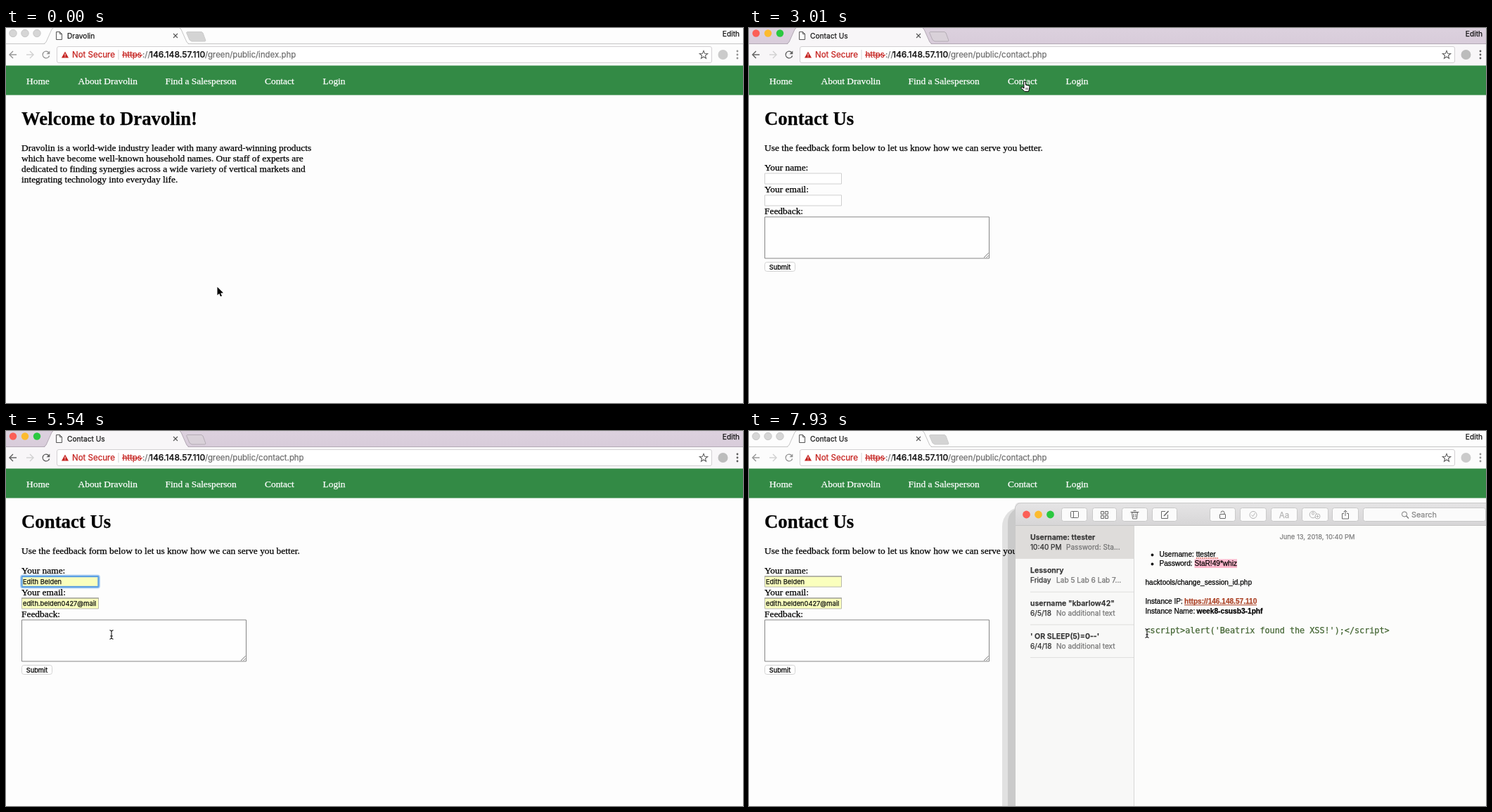
Animation of 1048x534 px, one loop 8000 ms. Source, as an HTML page with a canvas:

```html
<!DOCTYPE html>
<html lang="en">
<head>
<meta charset="utf-8">
<title>Feedback form</title>
<style>
html, body { margin: 0; width: 100%; height: 100%; overflow: hidden; background: #fdfdfd; }
canvas { display: block; width: 1048px; height: 534px; }
</style>
</head>
<body>
<canvas id="stage"></canvas>
<script>
const W = 1048, H = 534, LOOP = 8000;
const canvas = document.getElementById('stage');
const c = canvas.getContext('2d');
const dpr = window.devicePixelRatio || 1;
canvas.width = W * dpr;
canvas.height = H * dpr;

const SERIF = '"Liberation Serif", serif';
const UI = 'Inter, sans-serif';
const SANS = '"Liberation Sans", sans-serif';
const MONO = '"DejaVu Sans Mono", monospace';
const BODY = '13.42px ' + SERIF;
const BRAND = 'Dravolin';
const PERSON = 'Edith Belden';
const EMAIL = 'edith.belden0427@mail.test';

// Pointer poses: start time, x, y, shape
const POINTER = [
  [0, 300, 368, 'arrow'], [500, 303, 355, 'arrow'], [650, 315, 310, 'arrow'],
  [800, 332, 250, 'arrow'], [940, 348, 190, 'arrow'], [1090, 361, 140, 'arrow'],
  [1240, 371, 115, 'arrow'], [1390, 381, 95, 'arrow'], [1530, 387, 85, 'arrow'],
  [1680, 389, 80, 'arrow'], [2420, 390, 76, 'hand'], [3460, 340, 110, 'arrow'],
  [3610, 215, 195, 'arrow'], [3760, 124, 257, 'arrow'], [3910, 112, 266, 'arrow'],
  [4060, 108, 245, 'arrow'], [4200, 102, 224, 'arrow'], [4350, 98, 215, 'beam'],
  [4650, 110, 224, 'beam'], [4800, 118, 233, 'beam'], [5250, 118, 233, 'arrow'],
  [5400, 130, 255, 'arrow'], [5540, 150, 290, 'beam'], [5690, 152, 295, 'beam'],
  [5990, 165, 310, 'beam'], [6140, 205, 360, 'arrow'], [6290, 265, 420, 'arrow'],
  [6440, 335, 475, 'arrow'], [6580, 400, 518, 'arrow'], [6730, 430, 560, 'arrow'],
  [7480, 445, 500, 'arrow'], [7630, 505, 400, 'arrow'], [7780, 552, 315, 'beam'],
  [7930, 566, 288, 'beam']
];

// A hairline stroke gives the slightly heavy look of smoothed screen type
function text(s, x, y, font, color = '#000', align = 'left') {
  c.font = font;
  c.fillStyle = c.strokeStyle = color;
  c.textAlign = align;
  c.lineWidth = 0.25;
  c.fillText(s, x, y);
  c.strokeText(s, x, y);
}

function rect(x, y, w, h, color) {
  c.fillStyle = color;
  c.fillRect(x, y, w, h);
}

function paint(fill, stroke, width = 1) {
  if (fill) { c.fillStyle = fill; c.fill(); }
  if (stroke) { c.strokeStyle = stroke; c.lineWidth = width; c.stroke(); }
}

function box(x, y, w, h, r, fill, stroke, width) {
  c.beginPath();
  c.roundRect(x, y, w, h, r);
  paint(fill, stroke, width);
}

function disc(x, y, r, fill, stroke) {
  c.beginPath();
  c.arc(x, y, r, 0, 7);
  paint(fill, stroke);
}

function path(points, fill, stroke, width, close = true) {
  c.beginPath();
  points.forEach(([x, y]) => c.lineTo(x, y));
  if (close) c.closePath();
  paint(fill, stroke, width);
}

const line = (points, color, width = 1) => path(points, null, color, width, false);

function fade(y0, y1, top, bottom) {
  const g = c.createLinearGradient(0, y0, 0, y1);
  g.addColorStop(0, top);
  g.addColorStop(1, bottom);
  return g;
}

function drawBrowser(active, contact) {
  const edge = active ? '#b3a9b5' : '#c6c6c6';
  const face = active ? '#f8f6f8' : '#fcfcfc';
  const icon = active ? '#5c5c5c' : '#929292';
  rect(0, 0, W, 22, active ? fade(0, 22, '#dcd1de', '#d8ccda') : '#fdfdfd');
  rect(0, 22, W, 32, face);
  line([[0, 22.5], [W, 22.5]], edge);
  path([[55, 23], [57, 20], [65, 2], [67, 0], [247, 0], [249, 2], [257, 20], [259, 23]], face);
  line([[54, 22.5], [57, 20], [65, 2], [67, 0]], edge);
  line([[247, 0], [249, 2], [257, 20], [260, 22.5]], edge);
  path([[258, 5.5], [278, 5.5], [280, 7], [284, 18], [283, 19], [264, 19], [261, 17], [256.5, 6.5]],
    active ? '#d9d1d9' : '#d4d4d4', active ? '#b5adb6' : '#cbcbcb');
  const lights = active ? ['#fb5f57', '#fcbb2f', '#2ac840'] : ['#d6d6d6', '#d6d6d6', '#d6d6d6'];
  lights.forEach((color, i) => disc(10 + 17 * i, 7.5, 5.2, color, active ? null : '#c7c7c7'));

  path([[71.5, 5.5], [76.5, 5.5], [79.5, 8.5], [79.5, 16.5], [71.5, 16.5]], '#fff', '#555');
  line([[76.5, 5.5], [76.5, 8.5], [79.5, 8.5]], '#555');
  text(contact ? 'Contact Us' : BRAND, 87, 14.5, '10.2px ' + UI, '#1c1c1c');
  line([[238, 8], [244, 14]], '#555', 1.1);
  line([[244, 8], [238, 14]], '#555', 1.1);
  text('Edith', 1043, 12, '10.2px ' + UI, '#111', 'right');

  const arrow = (x, dir, color) => {
    line([[x - 5 * dir, 38], [x + 5 * dir, 38]], color, 1.4);
    line([[x, 33], [x + 5 * dir, 38], [x, 43]], color, 1.4);
  };
  arrow(10, -1, icon);
  arrow(34, 1, '#d0d0d0');
  c.beginPath();
  c.arc(57, 38, 4.8, 0.3, 5.5);
  paint(null, icon, 1.4);
  path([[62.3, 32.5], [62.3, 37.3], [57.5, 37.3]], icon);

  box(72.5, 26.5, 931, 23, 2.5, '#fff', '#d2d0d2');
  path([[84, 33.5], [89, 42.5], [79, 42.5]], '#c5221f');
  rect(83.5, 36.5, 1, 3, '#fff');
  rect(83.5, 40.4, 1, 1, '#fff');
  const url = '11.5px ' + UI;
  text('Not Secure', 94, 42, url, '#c5221f');
  rect(159.5, 31, 1, 14, '#d4d4d4');
  text('https', 165.5, 42, url, '#c5221f');
  rect(165, 38, 29, 1.1, '#c5221f');
  text('://', 194, 42, url, '#777');
  text('146.148.57.110', 204, 42, '500 12px ' + UI, '#111');
  text('/green/public/' + (contact ? 'contact' : 'index') + '.php', 283, 42, '11.4px ' + UI, '#707070');

  const star = [];
  for (let i = 0; i < 10; i++) {
    const r = i % 2 ? 2.6 : 6, a = i * Math.PI / 5 - Math.PI / 2;
    star.push([992 + r * Math.cos(a), 38.4 + r * Math.sin(a)]);
  }
  path(star, null, '#5f5f5f', 1.1);
  disc(1019.5, 38, 7, active ? '#bcbcbc' : '#cbcbcb');
  [33, 38, 43].forEach(y => disc(1040, y, 1.4, icon));

  rect(0, 53.5, W, 42, '#338a45');
  [['Home', 29], ['About ' + BRAND, 102.5], ['Find a Salesperson', 226.5], ['Contact', 368], ['Login', 450.5]]
    .forEach(([s, x]) => text(s, x, 80, BODY, '#fff'));
}

function drawHome() {
  text('Welcome to ' + BRAND + '!', 22, 138, 'bold 26.8px ' + SERIF);
  [BRAND + ' is a world-wide industry leader with many award-winning products',
    'which have become well-known household names. Our staff of experts are',
    'dedicated to finding synergies across a wide variety of vertical markets and',
    'integrating technology into everyday life.'
  ].forEach((s, i) => text(s, 22, 174.7 + 15.1 * i, BODY));
}

function ring(x, y, w, h) {
  box(x - 0.5, y - 0.5, w + 1, h + 1, 2, null, 'rgba(90,160,230,.45)', 4);
  box(x, y, w, h, 1, null, '#5b9fe3', 1.8);
}

function drawField(y, value, filled, focus) {
  box(22.5, y, 109, 15, 0, filled ? '#faffbd' : '#fff', filled ? '#b9b9ae' : '#cfcfcf');
  if (filled) line([[22, y], [132, y]], '#8f8f88');
  if (focus) ring(22.5, y, 109, 15);
  if (!filled) return;
  c.save();
  c.beginPath();
  c.rect(23, y, 106, 15);
  c.clip();
  text(value, 24, y + 11.3, '9.3px ' + UI, '#111');
  c.restore();
}

function drawForm(t) {
  const filled = t >= 5250;
  const nameFocus = t >= 4500 && t < 5690;
  const areaFocus = t >= 5690 && t < 7170;
  text('Contact Us', 22, 138, 'bold 26.8px ' + SERIF);
  text('Use the feedback form below to let us know how we can serve you better.', 22, 174.7, BODY);
  text('Your name:', 22, 203, BODY);
  text('Your email:', 22, 234, BODY);
  text('Feedback:', 22, 265, BODY);
  drawField(207, PERSON, t >= 4800, nameFocus);
  drawField(238, EMAIL, filled, false);

  box(22.5, 269, 319, 59, 0, '#fefefe', '#858585');
  if (areaFocus) ring(22.5, 269, 319, 59);
  line([[334, 327], [340.5, 320.5]], '#777');
  line([[337.5, 327], [340.5, 324]], '#777');
  box(22.5, 333.5, 43, 13, 3, '#fff', '#d2d2d2');
  text('Submit', 44, 343.6, '9.3px ' + UI, '#000', 'center');

  if (nameFocus && !filled && t < 4950) rect(24, 209, 1, 11, '#000');
  if (areaFocus && (t < 6290 || t >= 6730)) rect(24, 272, 1, 10, '#000');
  if (t >= 4650 && !filled) drawSuggestions(t >= 4800);
}

function drawSuggestions(hover) {
  box(22.5, 223.5, 235, 41.5, 0, '#fff', '#a3c3e8');
  if (hover) rect(23, 224, 234, 20, '#ffbbd0');
  text(PERSON, 29, 238, '600 10.7px ' + UI);
  text(EMAIL, 250, 238, '10.7px ' + UI, '#85777c', 'right');
  text('Autofill settings', 29, 259, '10.7px ' + UI, '#111');
}

function drawTooltip() {
  box(402.5, 520.5, 56, 24, 4, '#ededed', '#b9b9b9');
  text('Notes', 430.5, 536.5, '11.7px ' + UI, '#333', 'center');
}

function drawToolIcons() {
  const ink = '#686868', pale = '#b4b4b4';
  box(457.5, 114.5, 11, 9, 1, null, ink);
  line([[461.5, 114.5], [461.5, 123.5]], ink);
  for (const x of [500.5, 506.5]) for (const y of [114.5, 120.5]) box(x, y, 4, 4, 0, null, ink);
  path([[544.5, 116], [552.5, 116], [551.5, 125], [545.5, 125]], null, ink);
  line([[542.5, 115.5], [554.5, 115.5]], ink);
  line([[546.5, 113.5], [550.5, 113.5]], ink);
  [547, 550].forEach(x => line([[x, 118], [x, 123]], ink));
  line([[592, 114.5], [586.5, 114.5], [586.5, 124.5], [595.5, 124.5], [595.5, 119]], ink);
  line([[590, 121], [596.5, 114]], ink, 1.6);

  box(669.5, 118.5, 8, 6, 0.5, null, ink);
  c.beginPath();
  c.arc(673.5, 116.5, 2.5, Math.PI, 0);
  c.lineTo(676, 118.5);
  paint(null, ink);
  disc(717, 119.5, 5, null, pale);
  line([[714.5, 119.5], [716.5, 121.5], [719.5, 117]], pale);
  text('Aa', 761, 123.5, '11.5px ' + UI, pale, 'center');
  disc(802, 119, 4.8, null, pale);
  disc(802, 117.5, 1.6, null, pale);
  disc(808.5, 121.5, 3.5, '#fff', pale);
  line([[806.5, 121.5], [810.5, 121.5]], pale);
  line([[808.5, 119.5], [808.5, 123.5]], pale);
  line([[846, 117.5], [843.5, 117.5], [843.5, 125], [852.5, 125], [852.5, 117.5], [850, 117.5]], ink);
  line([[848, 121], [848, 113]], ink);
  line([[845.5, 115.5], [848, 113], [850.5, 115.5]], ink);
  disc(932, 118.5, 3.6, null, '#777');
  line([[934.7, 121], [938, 124.5]], '#777', 1.3);
  text('Search', 942, 123.3, '10.8px ' + UI, '#888');
}

function drawNotes() {
  box(360, 108, 760, 500, 28, 'rgba(0,0,0,.11)');
  box(368, 108, 750, 500, 22, 'rgba(0,0,0,.1)');
  c.save();
  c.beginPath();
  c.roundRect(378.5, 102, 700, 460, 5);
  c.clip();
  rect(378, 102, 670, 432, '#fcfcfb');
  rect(378, 102, 670, 33, fade(102, 135, '#e6e5e6', '#d6d5d6'));
  rect(378, 134, 670, 1, '#c4c4c4');
  rect(378, 135, 169, 399, '#f8f8f7');
  rect(378, 135, 169, 47, '#dedcda');
  rect(547, 135, 1, 399, '#d7d7d6');
  c.restore();
  line([[378.5, 534], [378.5, 108], [383, 103], [387, 102.5], [W, 102.5]], '#c9c9c9');

  ['#fb5f57', '#fcbb2f', '#2ac840'].forEach((color, i) => disc(394.5 + 17 * i, 119, 5.4, color));
  [[444, 37], [488, 35], [530, 37], [573, 36], [655, 37], [698, 38], [742, 38], [786, 38], [829, 38], [873, 175]]
    .forEach(([x, w]) => box(x + 0.5, 109.5, w - 1, 19, 3, '#fbfbfb', '#c9c9c9'));
  drawToolIcons();

  [['Username: ttester', '10:40 PM', 'Password: Sta...', 451],
    ['Lessonry', 'Friday', 'Lab 5 Lab 6 Lab 7...', 437],
    ['username "kbarlow42"', '6/5/18', 'No additional text', 437],
    ["' OR SLEEP(5)=0--'", '6/4/18', 'No additional text', 437]
  ].forEach(([title, when, note, x], i) => {
    const y = 155.3 + 47 * i;
    text(title, 400, y, '600 10.6px ' + UI, '#333');
    text(when, 400, y + 13.7, '10.1px ' + UI, '#333');
    text(note, x, y + 13.7, '10.1px ' + UI, '#777');
    if (i) rect(400, 182 + 46.7 * i, 147, 1, '#dededd');
  });

  const note = '10.1px ' + SANS;
  text('June 13, 2018, 10:40 PM', 808, 153.5, '9.4px ' + UI, '#808080', 'center');
  disc(573.5, 176.5, 1.9, '#111');
  disc(573.5, 189.5, 1.9, '#111');
  text('Username: ttester', 583.5, 179, note);
  c.setLineDash([1.5, 1.2]);
  line([[636, 181], [667, 181]], '#e0443c', 1.3);
  c.setLineDash([]);
  rect(633.5, 182.5, 60.5, 12.5, '#ffb8cd');
  text('Password: StaR!49*whiz', 583.5, 192.3, note);
  text('hacktools/change_session_id.php', 563.5, 219.3, note);
  text('Instance IP:', 563.5, 246, note);
  text('https://146.148.57.110', 619, 246, 'bold 10.1px ' + SANS, '#ad4428');
  rect(619, 247.3, 103, 1, '#ad4428');
  text('Instance Name:', 563.5, 259.5, note);
  text('week8-csusb3-1phf', 636.5, 259.5, 'bold 10.2px ' + SANS);
  text("<script>alert('Beatrix found the XSS!');<\/script>", 563.5, 288, '11.77px ' + MONO, '#426431');
}

function drawPointer(t) {
  const [, x, y, shape] = POINTER.filter(p => p[0] <= t).pop();
  c.save();
  c.translate(x, y);
  c.lineJoin = 'round';
  if (shape === 'arrow') {
    const tip = [[0.5, 0.8], [0.5, 12.6], [3.2, 10.1], [5, 14.2], [7, 13.4], [5.2, 9.4], [9, 9.2]];
    path(tip, '#000', '#fff', 1.8);
    path(tip, '#000');
  } else if (shape === 'hand') {
    path([[1.5, 0], [3, 0], [3.5, 1], [3.5, 5], [8, 6], [9, 7.5], [8.5, 11], [7.5, 14.5],
      [2, 14.5], [-3, 9.5], [-2.5, 8], [-1, 8.3], [1, 10], [0.8, 1]], '#fff', '#000', 1);
    [4, 6].forEach(k => line([[k, 9], [k, 12]], '#000', 0.7));
  } else {
    const beam = (color, w) => {
      line([[0, -5.5], [0, 5.5]], color, w);
      line([[-2.5, -6.5], [0, -5.3], [2.5, -6.5]], color, w);
      line([[-2.5, 6.5], [0, 5.3], [2.5, 6.5]], color, w);
      line([[-1.7, 2], [1.7, 2]], color, w);
    };
    beam('rgba(255,255,255,.8)', 2.6);
    beam('#111', 1.1);
  }
  c.restore();
}

function draw(t) {
  const contact = t >= 2720;
  c.setTransform(dpr, 0, 0, dpr, 0, 0);
  rect(0, 0, W, H, '#fdfdfd');
  drawBrowser(t >= 1840 && t < 7170, contact);
  if (contact) drawForm(t); else drawHome();
  if (t >= 6730 && t < 7330) drawTooltip();
  if (t >= 7330) drawNotes();
  drawPointer(t);
}

const start = performance.now();
function tick() {
  draw((performance.now() - start) % LOOP);
  requestAnimationFrame(tick);
}
tick();
</script>
</body>
</html>
```
